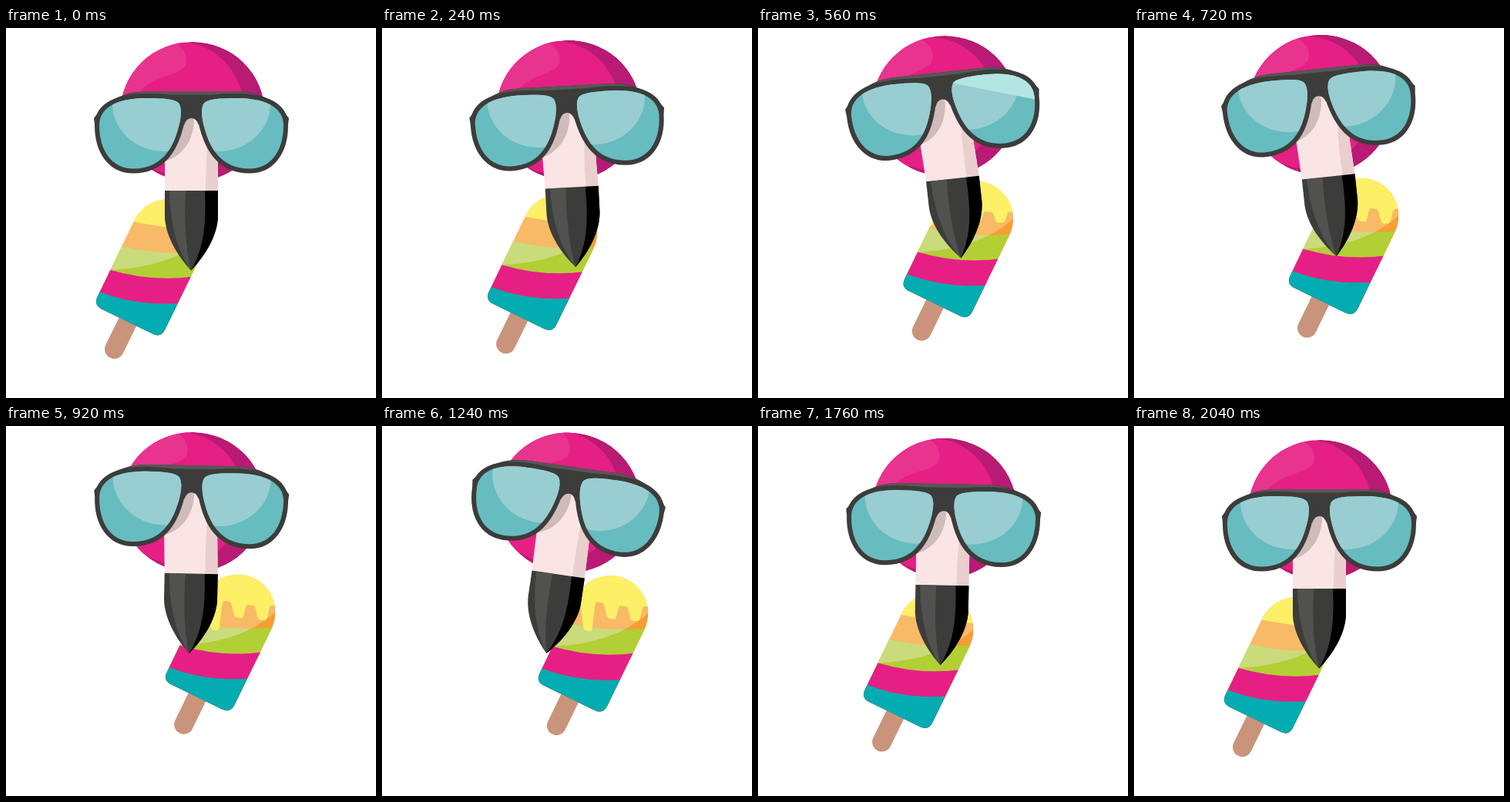
Write an HTML page with a canvas that moves like this. It is 480 px wide and 480 px high and loops after 3000 ms.

```html
<!DOCTYPE html>
<html lang="en">
<head>
<meta charset="utf-8">
<title>Cool flamingo</title>
<style>
html, body { margin: 0; width: 100%; height: 100%; overflow: hidden; background: #fff; }
canvas { display: block; width: 480px; height: 480px; }
</style>
</head>
<body>
<canvas id="stage" width="480" height="480"></canvas>
<script>
const ctx = document.getElementById('stage').getContext('2d');
const LOOP = 3000, STEP = 40, MOVE = 2000;
const DARK = '#3c3c3b', PINK = '#e61f84', TEAL = '#02acb0';
const clamp = (v, lo, hi) => Math.min(hi, Math.max(lo, v));
const mix = (a, b, k) => a + (b - a) * k;
const rad = deg => deg * Math.PI / 180;

// cubic-bezier(1/3, 0, 1/3, 1)
function ease(x) {
  let lo = 0, hi = 1;
  for (let i = 0; i < 24; i++) {
    const s = (lo + hi) / 2;
    if (s * (1 - s) + s ** 3 < x) lo = s; else hi = s;
  }
  return lo * lo * (3 - 2 * lo);
}

// rest -> a -> b -> rest, in three equal parts
function swing(t, a, b) {
  const keys = [0, a, b, 0], pos = clamp(t / MOVE, 0, 1) * 3;
  const i = Math.min(2, Math.floor(pos));
  return mix(keys[i], keys[i + 1], ease(pos - i));
}

function fill(path, color) {
  ctx.fillStyle = color;
  ctx.fill(typeof path === 'string' ? new Path2D(path) : path);
}

function group(draw) {
  ctx.save();
  draw();
  ctx.restore();
}

function poly(points, color) {
  ctx.beginPath();
  points.forEach(([x, y]) => ctx.lineTo(x, y));
  ctx.fillStyle = color;
  ctx.fill();
}

// turn a part about its pivot and move it
function pose([px, py], [dx, dy, angle]) {
  ctx.translate(px + dx, py + dy);
  ctx.rotate(angle);
  ctx.translate(-px, -py);
}

// the same for a single point
function place([x, y], [px, py], [dx, dy, angle]) {
  const c = Math.cos(angle), s = Math.sin(angle);
  x -= px;
  y -= py;
  return [px + dx + x * c - y * s, py + dy + x * s + y * c];
}

const iceBody = 'M-49 0A49 49 0 0 1 49 0V110Q49 122 37 122H-36.5Q-48.5 122 -48.5 110Z';
const greenArea = 'M135 279L150 283Q198 295 254 291H275V450H90Z';
const pinkArea = 'M120 309L134 313.5Q190 330 243 322.5H270V450H90Z';
const tealArea = 'M106 337L121 342Q168 361 228 357H250V450H90Z';
const litArea = 'M110 314H135Q215 310 258 272L290 200H100Z';

function meltEdge(x, melt) {
  const steepen = v => v * (1.5 - 0.5 * v * v);
  const wave = steepen(steepen(Math.cos((x - 181) / 30.8 * 2 * Math.PI)));
  const depth = x < 196.4 ? 40 : 19;
  return 251 + 11 * clamp((x - 163) / 66, 0, 1) + melt * depth * (0.5 + 0.5 * wave);
}

function drawIce(p) {
  ctx.translate(90.5 * p, -29.5 * p);
  group(() => {
    ctx.translate(210.5, 271);
    ctx.rotate(rad(26));
    ctx.strokeStyle = '#c9947b';
    ctx.lineWidth = 25;
    ctx.lineCap = 'round';
    ctx.stroke(new Path2D('M1 110V161.5'));
  });
  const body = new Path2D();
  body.addPath(new Path2D(iceBody), new DOMMatrix().translate(210.5, 271).rotate(26));
  ctx.clip(body);
  fill(body, '#f79d32');
  fill(greenArea, '#b2cf35');
  group(() => {
    ctx.clip(new Path2D(litArea));
    fill(body, '#f8ba66');
    fill(greenArea, '#cadb7c');
  });
  fill(pinkArea, PINK);
  fill(tealArea, TEAL);
  const melt = clamp((p - 0.45) / 0.47, 0, 1);
  const top = [[270, 200], [150, 200]];
  for (let x = 150; x <= 270; x += 0.5) top.push([x, meltEdge(x, melt)]);
  poly(top, '#fdf066');
}

function drawHead(p, angle) {
  pose([242, 109], [0, -10 * p, angle]);
  const disc = new Path2D('M148.5 109A93.5 91 0 0 1 335.5 109A93.5 91 0 0 1 148.5 109Z');
  ctx.clip(disc);
  fill(disc, '#b91a74');
  fill('M140 104A84 86 0 0 1 308 104A84 86 0 0 1 140 104Z', PINK);
  fill('M145 95V15H212C232 24 238 38 232 50C222 63 188 60 170 88Z', '#e8338f');
}

const facePivot = [240, 132], beakPivot = [240.5, 211];

function drawNose(glasses, beak) {
  const upper = (x, y) => place([x, y], facePivot, glasses);
  const lower = x => place([x, 211.5], beakPivot, beak);
  poly([upper(206, 110), upper(275, 110), upper(275, 172), lower(275), lower(206), upper(206, 172)], '#fae5e4');
  ctx.beginPath();
  ctx.moveTo(...upper(263, 135));
  ctx.quadraticCurveTo(...upper(259, 172), ...lower(259));
  [lower(275), upper(275, 172), upper(275, 135)].forEach(q => ctx.lineTo(...q));
  ctx.fillStyle = '#e9cfce';
  ctx.fill();
}

function drawBeak(beak) {
  pose(beakPivot, beak);
  const shape = new Path2D('M206 211V245C207 270 222 295 240 314.5C258 296 274 270 275 245V211Z');
  fill(shape, DARK);
  ctx.clip(shape);
  fill('M212 211H233C231 250 233 285 240 315C222 288 213 255 212 211Z', '#51514f');
  fill('M258 211C260 258 256 288 239 316H290V211Z', '#000');
}

const lens = new Path2D('M121 126C121 106 139 92 178 91C204 91 219 92 224 97.5Q229 104 225.5 122C218 155 203 182.5 165 182.5C138 182.5 121 160 121 126Z');

function drawGlasses(glasses, p) {
  pose(facePivot, glasses);
  fill('M231 122Q240 108 244 120C243 145 230 166 206 173L212 160Z', '#d0bbbb');
  fill('M114 117Q123 104 142 92Q158 82 185 82H296Q323 82 339 92Q358 104 367 117L366 125L355 106Q340 96 300 95H180Q140 96 126 106L115 125Z', DARK);
  fill('M223 83H258L250 126Q247 117 240.5 117Q234 117 231 126Z', DARK);
  fill('M152 88Q168 82 185 82H296Q313 82 329 88Q300 86.5 240 86.5T152 88Z', '#575756');
  for (const side of [1, -1]) group(() => {
    if (side < 0) {
      ctx.translate(481, 0);
      ctx.scale(-1, 1);
    }
    ctx.strokeStyle = DARK;
    ctx.lineWidth = 12;
    ctx.stroke(lens);
    fill(lens, '#67bcc0');
    ctx.clip(lens);
    fill('M138 98A67 62 0 0 1 272 98A67 62 0 0 1 138 98Z', '#98ced1');
    // the gleam keeps its slant while the glasses tilt
    ctx.setTransform(1, 0, 0, 1, 0, 0);
    const y = 315 - 345 * p;
    poly([[40, y - 40], [440, y + 40], [440, y + 67], [40, y - 13]], '#b3e5e3');
  });
}

function draw(t) {
  const p = ease(clamp(1 - Math.abs(t - 1000) / 1000, 0, 1));
  const tilt = rad(swing(t, -6.3, 8.4));
  const glasses = [0, -31 * p, tilt];
  const beak = [swing(t, 12.2, -12.2), -19.5 * p, rad(swing(t, -6.4, 8.6))];
  ctx.setTransform(1, 0, 0, 1, 0, 0);
  ctx.fillStyle = '#fff';
  ctx.fillRect(0, 0, 480, 480);
  group(() => drawIce(p));
  group(() => drawHead(p, tilt));
  drawNose(glasses, beak);
  group(() => drawBeak(beak));
  group(() => drawGlasses(glasses, p));
}

const start = performance.now();
function tick() {
  const t = (performance.now() - start) % LOOP;
  draw(Math.floor(t / STEP) * STEP);
  requestAnimationFrame(tick);
}
tick();
</script>
</body>
</html>
```
